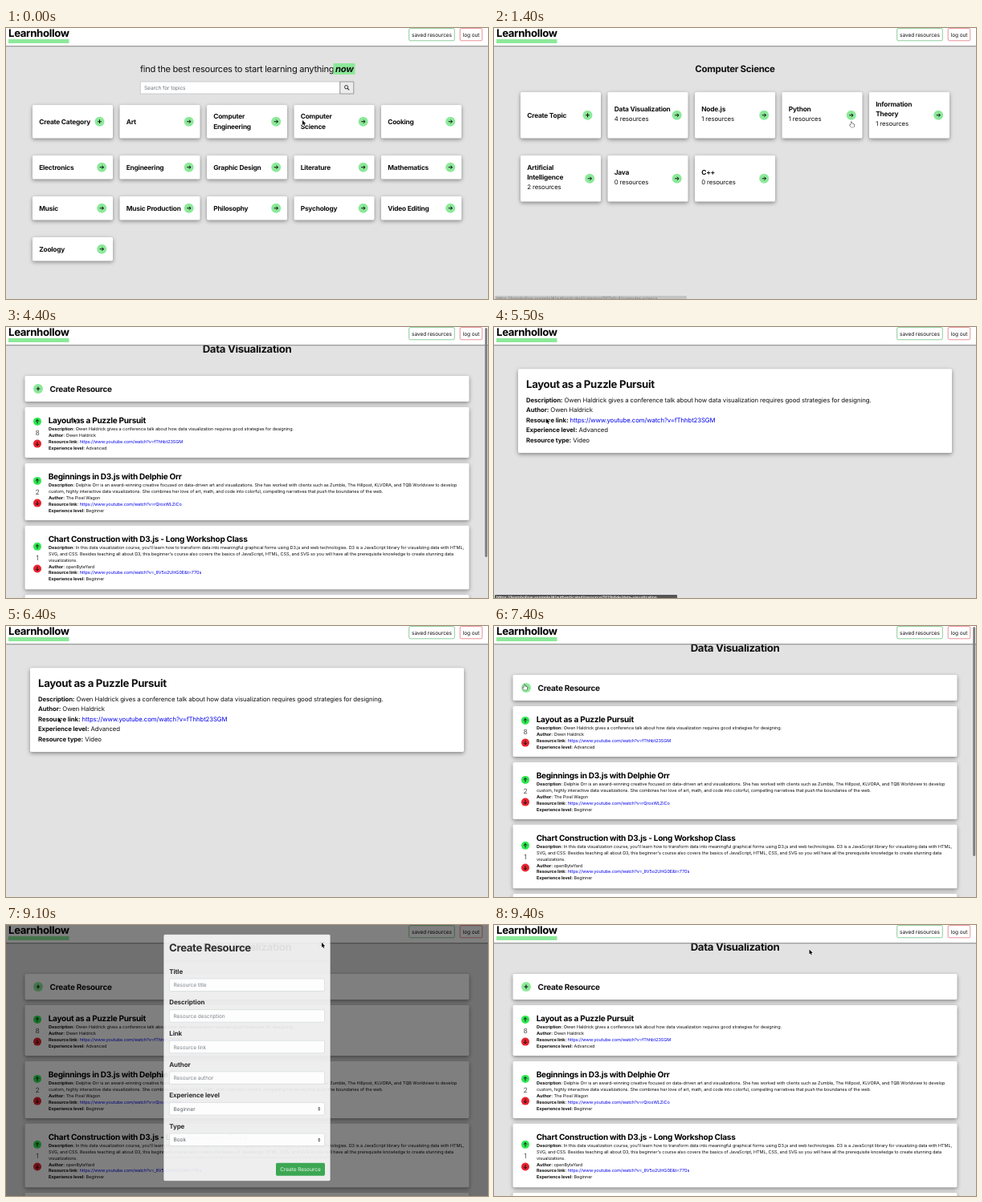
An HTML page with a canvas for the animation above (9500 ms loop, 600 by 338 pixels).

```html
<!DOCTYPE html>
<html lang="en">
<head>
<meta charset="utf-8">
<title>Learnhollow</title>
<style>
  html, body { margin: 0; width: 100%; height: 100%; overflow: hidden; background: #e2e2e2; }
  canvas { display: block; width: 600px; height: 338px; }
</style>
</head>
<body>
<canvas id="stage"></canvas>
<script>
const W = 600, H = 338, LOOP = 9500, STEP = 100;
const GREEN = '#8ce99a', INK = '#111';
const FINE = 5.53, SMALL = 6.55, BODY = 7.78;
const canvas = document.getElementById('stage');
const ratio = Math.max(1, window.devicePixelRatio || 1);
canvas.width = W * ratio;
canvas.height = H * ratio;
const ctx = canvas.getContext('2d');

const BRAND = 'Learnhollow';
const categories = ['Create Category', 'Art', 'Computer|Engineering', 'Computer|Science', 'Cooking',
  'Electronics', 'Engineering', 'Graphic Design', 'Literature', 'Mathematics',
  'Music', 'Music Production', 'Philosophy', 'Psychology', 'Video Editing', 'Zoology'];
const topics = [['Create Topic'], ['Data Visualization', 4], ['Node.js', 1], ['Python', 1],
  ['Information|Theory', 1], ['Artificial|Intelligence', 2], ['Java', 0], ['C++', 0]];
const WATCH = 'https://www.youtube.com/watch?v=';
const resources = [
  { top: 107, height: 63, votes: 8, title: 'Layout as a Puzzle Pursuit', author: 'Owen Haldrick',
    link: WATCH + 'fThhbt23SGM', level: 'Advanced',
    text: ['Owen Haldrick gives a conference talk about how data visualization requires good strategies for designing.'] },
  { top: 177, height: 71, votes: 2, title: 'Beginnings in D3.js with Delphie Orr', author: 'The Pixel Wagon',
    link: WATCH + 'rQroxWLZiCo', level: 'Beginner',
    text: ['Delphie Orr is an award-winning creative focused on data-driven art and visualizations. She has worked with clients such as Zumble, The Hillpost, KLVORA, and TQB Worldview to develop',
      'custom, highly interactive data visualizations. She combines her love of art, math, and code into colorful, compelling narratives that push the boundaries of the web.'] },
  { top: 254.7, height: 79.5, votes: 1, title: 'Chart Construction with D3.js - Long Workshop Class', author: 'openByteYard',
    link: WATCH + '_8V5o2UHG0E&t=770s', level: 'Beginner',
    text: ["In this data visualization course, you'll learn how to transform data into meaningful graphical forms using D3.js and web technologies. D3 is a JavaScript library for visualizing data with HTML,",
      "SVG, and CSS. Besides teaching all about D3, this beginner's course also covers the basics of JavaScript, HTML, CSS, and SVG so you will have all the prerequisite knowledge to create stunning data",
      'visualizations.'] }
];
const fields = [['Title', 'Resource title'], ['Description', 'Resource description'], ['Link', 'Resource link'],
  ['Author', 'Resource author'], ['Experience level', 'Beginner', true], ['Type', 'Book', true]];

const clamp = v => Math.min(1, Math.max(0, v));
const ramp = (t, from, to) => clamp((t - from) / (to - from));
const smooth = p => p * p * (3 - 2 * p);
const within = (t, ranges) => ranges.some(([a, b]) => t >= a && t < b);

// Draws text centred vertically on y and returns its width; larger type is tracked tighter.
function text(str, x, y, size, { weight = 400, color = INK, align = 'left', style = '' } = {}) {
  ctx.font = `${style} ${weight} ${size}px Inter, sans-serif`;
  ctx.textRendering = 'geometricPrecision';
  ctx.letterSpacing = `${(size < 8.2 ? -0.012 : -0.025) * size}px`;
  ctx.textAlign = align;
  ctx.fillStyle = color;
  ctx.fillText(str, x, y + size * 0.36);
  return ctx.measureText(str).width;
}
const bold = (str, x, y, size, opts) => text(str, x, y, size, { weight: 700, ...opts });

function box(x, y, w, h, fill, stroke, radius = 0, line = 0.7) {
  ctx.beginPath();
  ctx.roundRect(x, y, w, h, radius);
  if (fill) { ctx.fillStyle = fill; ctx.fill(); }
  if (stroke) { ctx.strokeStyle = stroke; ctx.lineWidth = line; ctx.stroke(); }
}

function lines(points, color, width) {
  ctx.beginPath();
  points.forEach(([x, y, move]) => move ? ctx.moveTo(x, y) : ctx.lineTo(x, y));
  ctx.strokeStyle = color;
  ctx.lineWidth = width;
  ctx.stroke();
}

function card(x, y, w, h) {
  ctx.save();
  ctx.shadowColor = 'rgba(0,0,0,.42)';
  ctx.shadowBlur = 5 * ratio;
  ctx.shadowOffsetY = 1.7 * ratio;
  box(x, y, w, h, '#fff', null, 1.7);
  ctx.restore();
}

function badge(x, y, r, fill, icon) {
  ctx.beginPath();
  ctx.arc(x, y, r, 0, Math.PI * 2);
  ctx.fillStyle = fill;
  ctx.fill();
  ctx.save();
  ctx.translate(x, y);
  if (icon === 'plus') {
    lines([[-2.4, 0, 1], [2.4, 0], [0, -2.4, 1], [0, 2.4]], INK, 1.1);
  } else {
    ctx.rotate({ right: 0, up: -Math.PI / 2, down: Math.PI / 2 }[icon]);
    lines([[-2.5, 0, 1], [2.3, 0], [0.2, -2.1, 1], [2.3, 0], [0.2, 2.1]], INK, 1);
  }
  ctx.restore();
}

function header() {
  box(0, 0, W, 22.3, '#fff');
  box(0, 22.2, W, 1, '#858585');
  box(3, 14, 75.5, 5, GREEN);
  bold(BRAND, 3, 6, 13.2, { color: '#000' });
  box(501.7, 0.6, 56.6, 15.2, '#fff', '#59b96f', 1.6);
  text('saved resources', 530, 8.4, SMALL, { align: 'center' });
  box(565.2, 0.6, 27.6, 15.2, '#fff', '#e4606d', 1.6);
  text('log out', 579, 8.4, SMALL, { align: 'center' });
}

function tile(index, y, h, label, count) {
  const x = 33 + (index % 5) * 108.5;
  const mid = y + h / 2;
  const rows = label.split('|');
  const total = rows.length + (count === undefined ? 0 : 1);
  const first = mid - (total - 1) * 6.25 - (count === undefined ? 0 : 1.6);
  card(x, y, 100, h);
  rows.forEach((row, i) => bold(row, x + 8.2, first + i * 12.5, 8.33));
  if (count !== undefined) text(`${count} resources`, x + 8.2, first + rows.length * 12.5, BODY);
  if (index) badge(x + 86.2, mid, 6, GREEN, 'right');
  else badge(x + 83.5, mid, 6, GREEN, 'plus');
}

function homePage() {
  text('find the best resources to start learning anything', 167, 51, 11.1);
  box(407.5, 44, 27, 14, GREEN);
  bold('now', 410, 51, 11.3, { style: 'italic' });
  box(167.3, 67, 248.5, 15, '#fff', '#b9bdc1');
  text('Search for topics', 172, 74.5, SMALL, { color: '#6c757d' });
  box(415.8, 67, 17, 15, '#ececec', '#777');
  ctx.beginPath();
  ctx.arc(423.6, 73.7, 2.1, 0, Math.PI * 2);
  ctx.strokeStyle = '#222';
  ctx.lineWidth = 0.9;
  ctx.stroke();
  lines([[425.2, 75.3, 1], [427.2, 77.3]], '#222', 1.1);
  categories.forEach((name, i) => {
    const row = Math.floor(i / 5);
    tile(i, row ? 108 + row * 51 : 96, row ? 29.4 : 41.4, name);
  });
}

function topicPage() {
  bold('Computer Science', 300, 51, 11.5, { align: 'center' });
  topics.forEach(([name, count], i) => tile(i, 80 + Math.floor(i / 5) * 79, 57.5, name, count));
}

function detail(label, value, x, y, size, color) {
  const width = bold(label + ':', x, y, size);
  text(value, x + width + size * 0.27, y, size, { color });
}

function listPage(scroll) {
  ctx.save();
  ctx.translate(0, -scroll);
  bold('Data Visualization', 300, 34, 13.2, { align: 'center' });
  card(23.5, 68, 553, 32);
  badge(40, 84, 6, GREEN, 'plus');
  bold('Create Resource', 54.5, 84.4, 10);
  for (const item of resources) {
    const mid = item.top + item.height / 2 + 0.4;
    card(23.5, item.top, 553, item.height);
    badge(39, mid - 14, 5, '#2fe851', 'up');
    text(item.votes, 39, mid, 8.6, { color: '#555', align: 'center' });
    badge(39, mid + 13.7, 5, '#e8232f', 'down');
    bold(item.title, 52.7, item.top + 16.2, 10, { color: '#000' });
    let y = item.top + 27;
    const next = () => (y += 7.95);
    detail('Description', item.text[0], 53, y, FINE);
    item.text.slice(1).forEach(row => text(row, 53, next(), FINE));
    detail('Author', item.author, 53, next(), FINE);
    detail('Resource link', item.link, 53, next(), FINE, '#00e');
    detail('Experience level', item.level, 53, next(), FINE);
  }
  card(23.5, 341, 553, 60);
  ctx.restore();
}

function detailPage() {
  const item = resources[0];
  card(30, 52.3, 540, 104.7);
  bold(item.title, 40, 70.8, 13.2);
  const rows = [['Description', item.text[0]], ['Author', item.author], ['Resource link', item.link, '#00e'],
    ['Experience level', item.level], ['Resource type', 'Video']];
  rows.forEach(([label, value, color], i) => detail(label, value, 40, 91 + i * 12.5, BODY, color));
}

function modal(alpha, shift) {
  ctx.save();
  ctx.globalAlpha = alpha;
  ctx.translate(0, shift);
  box(196.2, 12, 207.6, 307.5, '#fff', 'rgba(0,0,0,.3)', 2, 0.5);
  bold('Create Resource', 203, 29, 13.2);
  lines([[391.6, 22, 1], [395.4, 25.8], [395.4, 22, 1], [391.6, 25.8]], '#444', 1);
  box(196.5, 45, 207, 0.6, '#dee2e6');
  fields.forEach(([label, value, select], i) => {
    const y = 58.2 + i * 38.6;
    bold(label, 203.2, y, 8);
    box(203.4, y + 9.1, 193.2, 15.5, '#fff', '#ced4da', 1.7);
    text(value, 208.5, y + 17, SMALL, { color: select ? '#495057' : '#6c757d' });
    if (!select) return;
    for (const dir of [-1, 1]) {
      ctx.beginPath();
      ctx.moveTo(388.2, y + 17 + dir * 0.5);
      ctx.lineTo(391.4, y + 17 + dir * 0.5);
      ctx.lineTo(389.8, y + 17 + dir * 2.5);
      ctx.fillStyle = '#343a40';
      ctx.fill();
    }
  });
  box(196.5, 289.8, 207, 0.6, '#dee2e6');
  box(336, 297, 61, 16, '#219c3b', null, 1.7);
  text('Create Resource', 366.5, 305, SMALL, { color: '#fff', align: 'center' });
  ctx.restore();
}

function statusBar(width, fill, color, path) {
  ctx.save();
  ctx.beginPath();
  ctx.rect(1, 334, width, 4);
  ctx.clip();
  box(1, 334, width, 8, fill, null, 1);
  bold('https://learnhollow.example/#/authenticated/' + path, 3, 337.6, 5, { color });
  ctx.restore();
}

function shape(points, fill, stroke, width) {
  ctx.beginPath();
  points.forEach(([x, y], i) => i ? ctx.lineTo(x, y) : ctx.moveTo(x, y));
  ctx.closePath();
  ctx.lineJoin = 'round';
  ctx.strokeStyle = stroke;
  ctx.lineWidth = width;
  ctx.stroke();
  ctx.fillStyle = fill;
  ctx.fill();
}

const arrowShape = [[0, 0], [0, 6], [1.4, 4.8], [2.4, 7], [3.3, 6.6], [2.4, 4.4], [4.2, 4.3]];
const handShape = [[-0.6, 0], [0.4, 0], [0.5, 2.2], [3.2, 2.8], [3.6, 4], [2.9, 6.7], [-0.6, 6.7], [-2.4, 4], [-1.8, 3.4], [-0.7, 4.2]];
const cursorPath = [[0, 369, 115], [200, 369, 115], [800, 445, 117], [1400, 445, 117], [2000, 227, 110],
  [2500, 227, 112], [3300, 227, 112], [4700, 65, 114], [6600, 65, 114], [7300, 38, 73],
  [7500, 38, 73], [7800, 177.5, 101], [8900, 393, 22], [9100, 393, 22], [9400, 392.5, 30.5], [9500, 392.5, 30.5]];
const handTimes = [[700, 1600], [1900, 3300], [4500, 5300], [7200, 7500]];

function cursor(t) {
  const i = cursorPath.findIndex(([time]) => time > t);
  const [t0, x0, y0] = cursorPath[i - 1], [t1, x1, y1] = cursorPath[i];
  const p = smooth(ramp(t, t0, t1));
  ctx.save();
  ctx.translate(x0 + (x1 - x0) * p, y0 + (y1 - y0) * p);
  if (within(t, handTimes)) shape(handShape, '#fff', '#222', 1);
  else shape(arrowShape, '#000', '#fff', 1.5);
  ctx.restore();
}

function page(t) {
  if (t < 1000) return homePage();
  if (t < 2400) return topicPage();
  if (t >= 5300 && t < 6500) return detailPage();
  listPage(7 * smooth(ramp(t, 3300, 3900)));
}

function draw(t) {
  ctx.setTransform(ratio, 0, 0, ratio, 0, 0);
  ctx.fillStyle = '#e2e2e2';
  ctx.fillRect(0, 0, W, H);
  page(t);
  header();
  if (within(t, [[3400, 4500], [6500, 7500]])) box(596.2, 1, 3, 286, '#808080', null, 1.5);
  if (within(t, [[800, 1700], [1900, 2600]])) statusBar(239, '#c4c4c4', '#888', 'category/5f17a0c4/computer-science');
  if (within(t, [[4600, 5800]])) statusBar(227, '#555', '#eee', 'resource/5f21b6de/data-visualization');

  const backdrop = ramp(t, 7450, 7600) * (1 - ramp(t, 9200, 9350));
  if (backdrop > 0) {
    ctx.fillStyle = `rgba(0,0,0,${backdrop / 2})`;
    ctx.fillRect(0, 0, W, H);
    const alpha = ramp(t, 7480, 7630) * (1 - ramp(t, 9080, 9230));
    const slide = t < 8500 ? 1 - ramp(t, 7480, 7780) : ramp(t, 9080, 9380);
    modal(alpha, -20 * smooth(slide));
  }
  cursor(t);
}

function tick(now) {
  const t = now % LOOP;
  draw(Math.floor(t / STEP) * STEP);
  requestAnimationFrame(tick);
}
requestAnimationFrame(tick);
</script>
</body>
</html>
```
